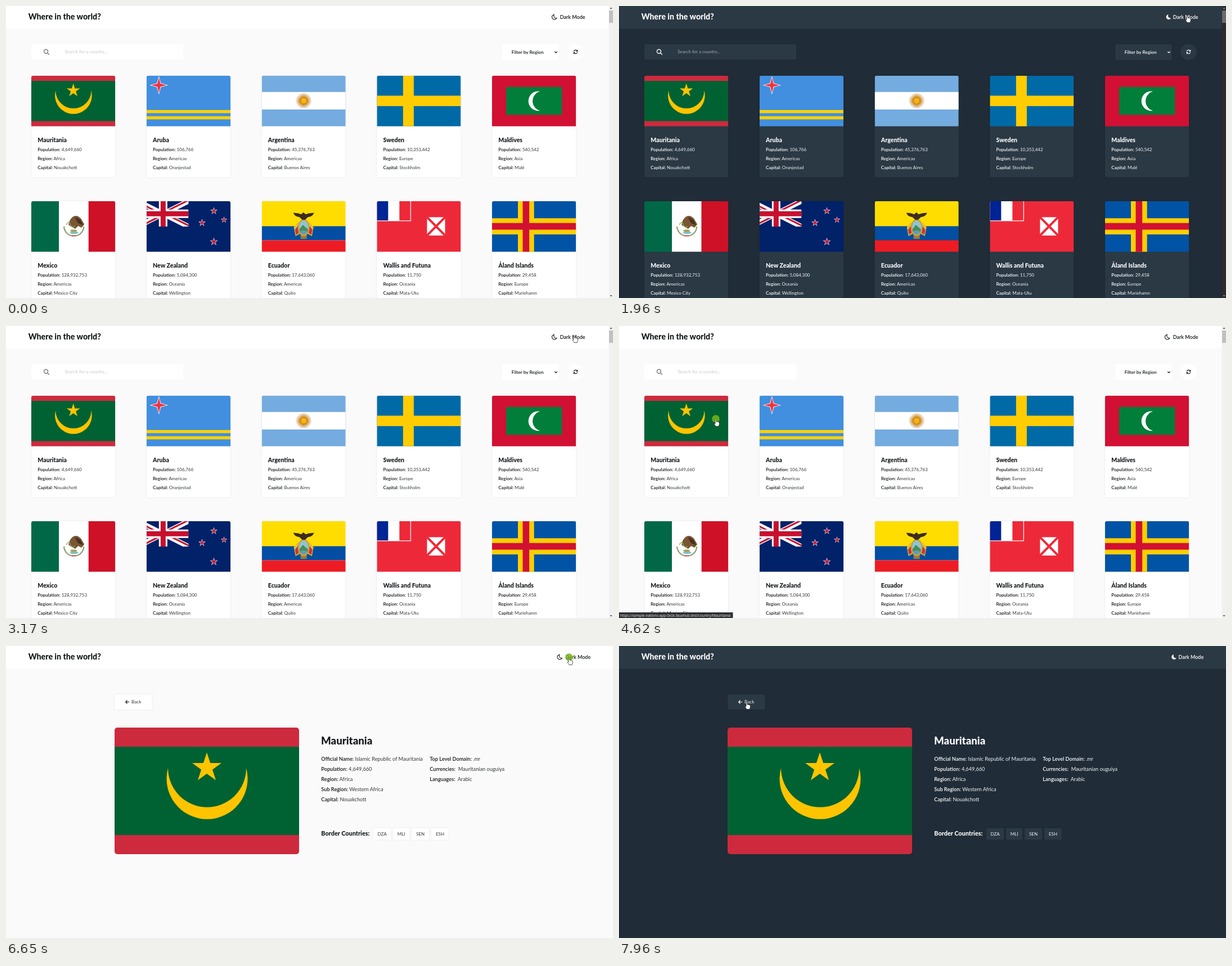
An HTML page that plays this animation: 1079 px wide and 519 px high, repeating every 8 s.

```html
<!DOCTYPE html>
<html lang="en">
<head>
<meta charset="utf-8">
<title>Country browser</title>
<style>
html, body { margin: 0; width: 100%; height: 100%; overflow: hidden; }
#stage {
  display: block; width: 100%; height: 100%;
  font-family: Lato, "Open Sans", sans-serif; font-size: 8px;
  --bg: #fafafa; --panel: #fff; --ink: #111517; --soft: #33373a; --hint: #c6c6c6;
  --lens: #777; --track: #f1f1f1; --thumb: #c1c1c1; --arrow: #505050; --shade: #0000001c;
}
#stage.dark {
  --bg: #202c37; --panel: #2b3945; --ink: #fff; --soft: #f2f4f5; --hint: #a3abb2;
  --lens: #fff; --track: #2c2c2c; --thumb: #6b6b6b; --arrow: #8a8a8a; --shade: #00000030;
}
text { fill: var(--ink); white-space: pre; }
.value { fill: var(--soft); }
.label { fill: var(--ink); font-weight: 600; }
.title { font-weight: 800; }
.panel { fill: var(--panel); }
.raised { fill: var(--panel); filter: drop-shadow(0 0 1.3px var(--shade)); }
.line { fill: none; stroke: var(--ink); stroke-width: 1.1; }
#moon { fill: none; stroke: var(--ink); stroke-width: 1.1; }
.dark #moon { fill: var(--ink); stroke: none; }
</style>
</head>
<body>
<svg id="stage" viewBox="0 0 1079 519"></svg>
<script>
const LOOP = 8000;
const stage = document.getElementById('stage');

// ---- drawing helpers ----
const rect = (x, y, w, h, fill, extra = '') =>
  `<rect x="${x}" y="${y}" width="${w}" height="${h}" fill="${fill}" ${extra}/>`;
const box = (x, y, w, h, cls, r = 2.5) =>
  `<rect x="${x}" y="${y}" width="${w}" height="${h}" rx="${r}" class="${cls}"/>`;
const path = (d, fill, extra = '') => `<path d="${d}" fill="${fill}" ${extra}/>`;
const stroke = (d, color, width) => path(d, 'none', `stroke="${color}" stroke-width="${width}"`);
const circle = (x, y, r, fill, extra = '') => `<circle cx="${x}" cy="${y}" r="${r}" fill="${fill}" ${extra}/>`;
const ellipse = (x, y, rx, ry, fill) => `<ellipse cx="${x}" cy="${y}" rx="${rx}" ry="${ry}" fill="${fill}"/>`;
const text = (x, y, size, content, cls = '') =>
  `<text x="${x}" y="${y}" font-size="${size}" class="${cls}">${content}</text>`;
const field = (x, y, size, label, value, gap = ' ') =>
  text(x, y, size, `<tspan class="label">${label}:</tspan>${gap}${value}`, 'value');

function star(cx, cy, radius, fill, points = 5, inner = 0.382, extra = '') {
  const corners = Array.from({ length: points * 2 }, (_, i) => {
    const r = i % 2 ? radius * inner : radius, a = i * Math.PI / points;
    return `${(cx + r * Math.sin(a)).toFixed(2)},${(cy - r * Math.cos(a)).toFixed(2)}`;
  });
  return `<polygon points="${corners.join(' ')}" fill="${fill}" ${extra}/>`;
}

// ---- flags, drawn on 149 x 90 unless they bring their own size ----
const mauritania =
  rect(0, 0, 328, 225, '#cd2a3e') + rect(0, 34, 328, 157, '#006233') +
  path('M95 72A72 72 0 1 0 234 72A69.5 69.5 0 0 1 95 72Z', '#ffc400') +
  star(164, 71.5, 27.3, '#ffc400');

const aruba =
  rect(0, 0, 149, 90, '#418fde') + rect(0, 61, 149, 5.5, '#ffd100') + rect(0, 72, 149, 5.5, '#ffd100') +
  star(22, 17, 16.5, '#fff', 4, 0.3) + star(22, 17, 13.8, '#ef3340', 4, 0.28);

const argentina =
  rect(0, 0, 149, 90, '#74acdf') + rect(0, 29, 149, 31, '#fff') +
  star(74.5, 44.5, 13.5, '#e5a02a', 32, 0.5, 'stroke="#a8641c" stroke-width=".3"') +
  circle(74.5, 44.5, 5.6, '#f6b40e', 'stroke="#a35a16" stroke-width=".7"');

const sweden =
  rect(0, 0, 149, 90, '#006aa7') + rect(46.5, 0, 19, 90, '#fecc00') + rect(0, 35.5, 149, 18.5, '#fecc00');

const maldives =
  rect(0, 0, 149, 90, '#d21034') + rect(25, 20, 99, 49.5, '#007e3a') +
  path('M85 28A17.3 17.3 0 1 0 85 62A17.6 17.6 0 0 1 85 28Z', '#fff');

const mexico =
  rect(0, 0, 49, 90, '#006847') + rect(49, 0, 52.5, 90, '#fff') + rect(101.5, 0, 48, 90, '#ce1126') +
  stroke('M58 45A17 17 0 0 0 73 61.5M79 61.5A17 17 0 0 0 93 45', '#8fa878', 2.4) +
  ellipse(76, 56, 7.5, 2.4, '#7dbfc6') + ellipse(75, 52.5, 6, 2.2, '#a3a55a') +
  path('M66 42Q68 31 75 27Q82 24 88 31L94 41L89 47L83 44L78 49L72 46Z', '#7a5633') +
  path('M77 28L87 33L92 43L83 39Z', '#46301f') + stroke('M62 42Q67 34 69 41T77 45', '#8da458', 1.4) +
  rect(72, 60.5, 7, 2, '#c5443e');

const unionJack =
  rect(-16, 0, 90.5, 45, '#012169') +
  stroke('M-15.5 0L74.5 45M74.5 0L-15.5 45', '#fff', 9) +
  stroke('M-15.5 1.7L29.5 24.2M74.5 43.3L29.5 20.8M74.5 -1.7L29.5 20.8M-15.5 46.7L29.5 24.2', '#c8102e', 3) +
  stroke('M29.5 0V45M-16 22.5H74.5', '#fff', 15) + stroke('M29.5 0V45M-16 22.5H74.5', '#c8102e', 9);
const newZealand =
  rect(0, 0, 149, 90, '#012169') +
  `<svg width="74.5" height="45">${unionJack}</svg>` +
  [[119.5, 17.5, 6.8], [98.5, 38.5, 6.8], [137.5, 33.3, 6], [119.5, 72, 7.5]]
    .map(([x, y, r]) => star(x, y, r, '#fff') + star(x, y, r * 0.75, '#c8102e')).join('');

const ecuador =
  rect(0, 0, 149, 45, '#ffdd00') + rect(0, 44.5, 149, 25, '#034ea2') + rect(0, 69.5, 149, 21, '#ed1c24') +
  path('M65 36L57 46L60 62L67 58ZM84 36L92 46L89 62L82 58Z', '#e8bd35') +
  path('M64 44L59 51L61 60L66 56ZM85 44L90 51L88 60L83 56Z', '#c8343c') +
  rect(69, 60, 11, 7, '#a9762f') +
  ellipse(74.5, 47, 10.5, 15, '#c8a13a') + ellipse(74.5, 47, 8.2, 12.5, '#8cc6d8') +
  path('M66.8 50L73 42L82.2 50Q81 58 74.5 59Q68 58 66.8 50Z', '#4d8b57') + ellipse(74.5, 55, 6, 3, '#5aa0bd') +
  path('M56 21Q64 20 70 23.5L74 20L78 23.5Q85 20 93 21Q90 28 82 28.5L77 33H72L67 28.5Q59 28 56 21Z', '#3b2d20');

const wallis =
  rect(0, 0, 149, 90, '#ed2939') + rect(0, 0, 60.5, 35.5, '#fff') +
  rect(0, 0, 20, 34.3, '#002395') + rect(40, 0, 19.3, 34.3, '#ed2939') +
  rect(89, 28.5, 32, 32.5, '#fff') + stroke('M88 27.5L122 62M122 27.5L88 62', '#ed2939', 4);

const aland =
  rect(0, 0, 149, 90, '#0053a5') + stroke('M60.2 0V90M0 44.7H149', '#ffce00', 28.6) +
  stroke('M60.2 0V90M0 44.7H149', '#d21034', 11.6);

const clips =
  '<clipPath id="cardClip"><rect width="149.3" height="100" rx="3"/></clipPath>' +
  '<clipPath id="detailClip"><rect width="328" height="225" rx="5"/></clipPath>';

const flag = (art, x, y, w, h, clip, size = '149 90') =>
  `<g transform="translate(${x} ${y})" clip-path="url(#${clip})">
    <svg width="${w}" height="${h}" viewBox="0 0 ${size}" preserveAspectRatio="xMidYMid slice">${art}</svg></g>`;

// ---- list page ----
const countries = [
  ['Mauritania', '4,649,660', 'Africa', 'Nouakchott', mauritania, '328 225'],
  ['Aruba', '106,766', 'Americas', 'Oranjestad', aruba],
  ['Argentina', '45,376,763', 'Americas', 'Buenos Aires', argentina],
  ['Sweden', '10,353,442', 'Europe', 'Stockholm', sweden],
  ['Maldives', '540,542', 'Asia', 'Malé', maldives],
  ['Mexico', '128,932,753', 'Americas', 'Mexico City', mexico],
  ['New Zealand', '5,084,300', 'Oceania', 'Wellington', newZealand],
  ['Ecuador', '17,643,060', 'Americas', 'Quito', ecuador],
  ['Wallis and Futuna', '11,750', 'Oceania', 'Mata-Utu', wallis],
  ['Åland Islands', '29,458', 'Europe', 'Mariehamn', aland],
];
const cardX = i => 45 + (i % 5) * 204.75;

function card([name, population, region, capital, art, size], i) {
  const x = cardX(i), y = 124 + Math.floor(i / 5) * 223, tx = x + 11.3;
  return box(x, y, 149.3, 180.5, 'raised', 3) + flag(art, x, y, 149.3, 89.8, 'cardClip', size) +
    text(tx, y + 117.7, 10.6, name, 'title') +
    field(tx, y + 134.3, 8, 'Population', population) +
    field(tx, y + 150.2, 8, 'Region', region) +
    field(tx, y + 166, 8, 'Capital', capital);
}

const controls =
  box(45, 68, 270, 27, 'panel') +
  `<g fill="none" stroke="var(--lens)" stroke-width="1.4">
    <circle cx="71" cy="80.7" r="3.5"/><path d="M73.5 83.2L76.8 86.5"/></g>` +
  `<text x="104.3" y="84.2" style="fill:var(--hint)">Search for a country...</text>` +
  box(882.5, 68, 100, 28, 'panel') + text(898.7, 84.7, 8.3, 'Filter by Region', 'label') +
  '<path class="line" d="M975.3 81L977.5 83.2L979.7 81"/>' +
  '<circle class="panel" cx="1012.5" cy="81.7" r="14.3"/>' +
  '<path class="line" d="M1009.3 81A3.3 3.3 0 0 1 1015 79.3M1015.7 82A3.3 3.3 0 0 1 1010 83.7"/>' +
  path('M1016.3 77.6V81H1012.9ZM1008.7 85.4V82H1012.1Z', 'var(--ink)');

const scrollbar =
  rect(1071.5, 0, 7.5, 519, 'var(--track)') + rect(1072, 8, 7, 22, 'var(--thumb)') +
  path('M1073.3 5L1075.5 2.6L1077.7 5ZM1073.3 514L1075.5 516.4L1077.7 514Z', 'var(--arrow)');

const statusBar =
  rect(0, 509, 202.5, 10, '#2f3033') +
  `<text x="2" y="516.6" font-size="6.4" font-family="Open Sans, Noto Sans, sans-serif"
    style="fill:#e8e8e8">https://sample-nations-app-0x0x.fauxhub.test/country/Mauritania</text>`;

// ---- detail page ----
const borders = [['DZA', 653, 31.3], ['MLI', 688, 29.3], ['SEN', 721, 31], ['ESH', 756, 31]];
const nbsp = '\u00a0\u00a0';
const detail =
  box(193, 86, 66.5, 27, 'raised', 2) + '<path class="line" d="M219 99.5H212.7M215.6 96.5L212.6 99.5L215.6 102.5"/>' +
  text(223, 102.4, 8.2, 'Back', 'value') +
  flag(mauritania, 193, 145, 328, 225, 'detailClip', '328 225') +
  text(560, 175.2, 18.7, 'Mauritania', 'title') +
  [['Official Name', 'Islamic Republic of Mauritania'], ['Population', '4,649,660'], ['Region', 'Africa'],
   ['Sub Region', 'Western Africa'], ['Capital', 'Nouakchott']]
    .map(([label, value], i) => field(560.3, 203.5 + i * 18, 9.2, label, value)).join('') +
  field(753.2, 203.5, 9.2, 'Top Level Domain', '.mr') +
  field(753.2, 221.5, 9.2, 'Currencies', 'Mauritanian ouguiya', nbsp) +
  field(753.2, 239.5, 9.2, 'Languages', 'Arabic', nbsp) +
  text(560.3, 336.8, 10.9, 'Border Countries:', 'title') +
  borders.map(([code, x, w]) => box(x, 323.5, w, 21, 'raised', 1.5) +
    `<text x="${x + w / 2}" y="336.9" text-anchor="middle" class="value">${code}</text>`).join('');

// ---- assembly ----
stage.innerHTML = clips +
  rect(0, 0, 1079, 519, 'var(--bg)') + box(0, 0, 1079, 40.5, 'panel', 0) +
  text(39.7, 24.4, 14.2, 'Where in the world?', 'title') +
  `<g id="toggle"><path id="moon" d="M-.5 -4.4A4.4 4.4 0 1 0 4 1.9A4.3 4.3 0 0 1 -.5 -4.4Z"/>
    ${text(984.8, 22.8, 9, 'Dark Mode', 'label')}</g>` +
  `<g id="list">${controls}${countries.map(card).join('')}${scrollbar}</g>` +
  `<g id="detail">${detail}</g><g id="status">${statusBar}</g>` +
  circle(0, 0, 6.8, '#74b816', 'id="press" fill-opacity=".85"') +
  `<g id="cursor" fill="#fff" stroke="#111" stroke-width=".7" stroke-linejoin="round">
    <path id="pointer" d="M0 0V10.3L2.4 8.2L4.1 11.8L5.7 11.1L4.1 7.6H7.3Z"/>
    <path id="hand" d="M-1 1.5Q0 -.5 1 1.5V5.2Q2 4.4 2.8 5.4Q4 4.8 4.6 5.8Q6 5.4 6.4 7V9.5L5.2 13.5H0L-3 8.8Q-2.6 7.2 -1 8.6Z"/>
  </g>`;

const el = id => document.getElementById(id);
const show = (id, on) => { el(id).style.display = on ? '' : 'none'; };
const move = (id, x, y) => el(id).setAttribute('transform', `translate(${x} ${y})`);

// ---- motion: [start, end, steps, x, y] ----
const moves = [
  [320, 1090, 12, 1012, 28], [1160, 1230, 2, 1010, 16],
  [3440, 4210, 12, 184, 153], [4280, 4350, 2, 172, 165],
  [5810, 6450, 10, 1001, 20],
  [6990, 7610, 10, 262, 148], [7680, 7750, 2, 232, 120], [7820, 7960, 3, 227, 99],
];
const presses = [[1630, 1760], [2840, 2970], [4620, 4750], [6650, 6730]];
const within = (t, [from, to]) => t >= from && t < to;
const ease = u => (u + u * u * (3 - 2 * u)) / 2;

function cursorAt(t) {
  let x = 1051, y = 530;
  for (const [start, end, steps, toX, toY] of moves) {
    if (t < start) break;
    const step = Math.min(steps, Math.floor((t - start) / (end - start) * (steps - 1) + 0.001) + 1);
    const k = ease(step / steps);
    x += (toX - x) * k;
    y += (toY - y) * k;
  }
  return [x, y];
}

function isLink(x, y, onDetail) {
  if (x > 970 && y > 12 && y < 26) return true;
  if (onDetail) return x > 193 && x < 260 && y > 86 && y < 113;
  return y > 124 && y < 304 && countries.some((_, i) => x > cardX(i) && x < cardX(i) + 149);
}

function render(t) {
  const onDetail = t >= 4820;
  const dark = within(t, [1960, 3170]) || t >= 6730;
  const [x, y] = cursorAt(t);
  const link = isLink(x, y, onDetail);

  stage.classList.toggle('dark', dark);
  show('list', !onDetail);
  show('detail', onDetail);
  show('status', within(t, [4420, 4820]));
  move('toggle', onDetail ? 9.6 : 0, 0);
  move('moon', dark ? 977 : 974.8, 19.6);

  show('press', presses.some(span => within(t, span)));
  move('press', x, y);
  show('cursor', t >= 320);
  move('cursor', x, y);
  show('pointer', !link);
  show('hand', link);
}

function frame(now) {
  render(now % LOOP);
  requestAnimationFrame(frame);
}
render(0);
requestAnimationFrame(frame);
</script>
</body>
</html>
```
